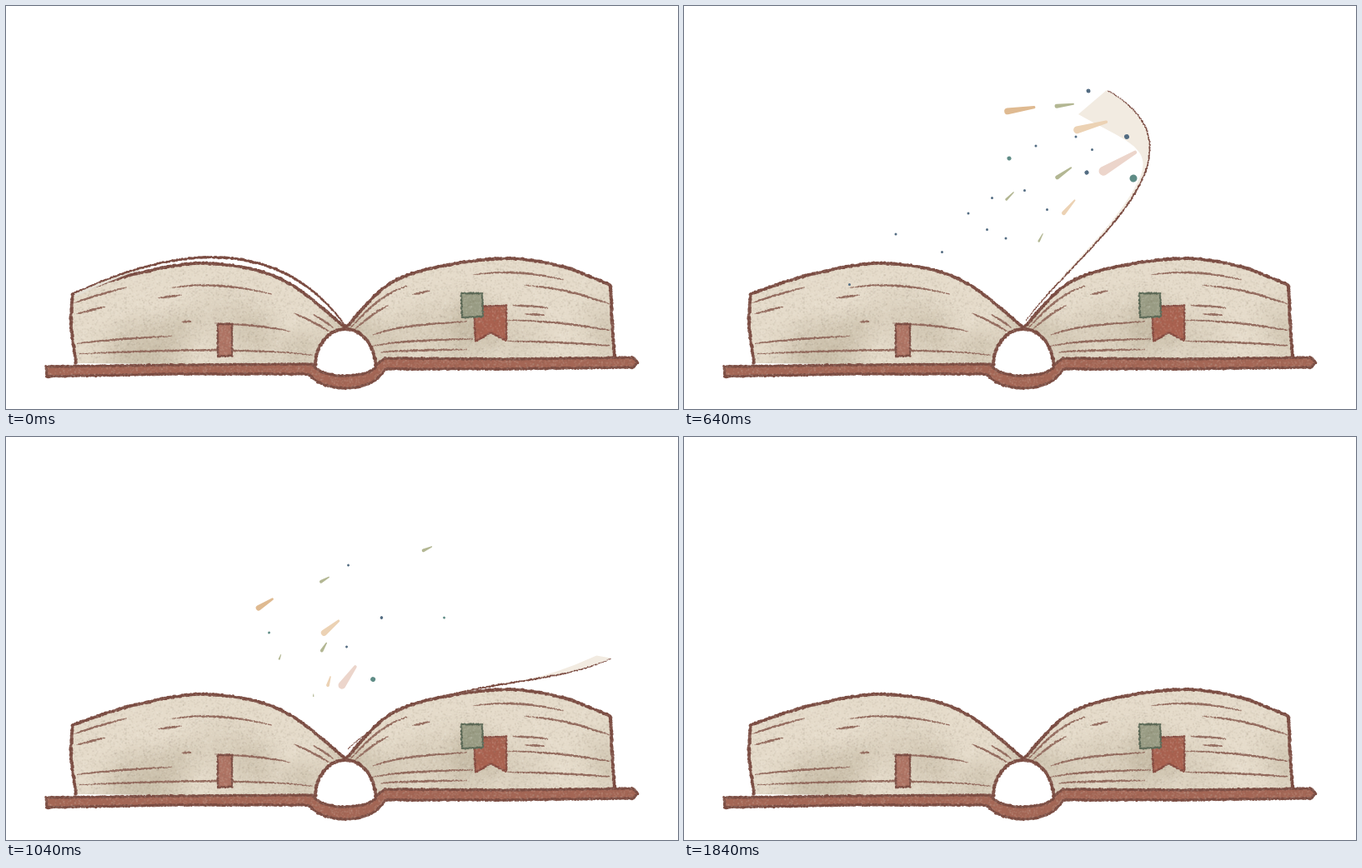
Animation of 806x484 px, one loop 1.92 s. Source, as an HTML page with a canvas:

```html
<!DOCTYPE html>
<html lang="en">
<head>
<meta charset="utf-8">
<title>Book turning a page</title>
<style>
html, body { margin: 0; width: 100%; height: 100%; overflow: hidden; background: #fff; }
canvas { display: block; }
</style>
</head>
<body>
<canvas id="stage" width="806" height="484"></canvas>
<script>
const W = 806, H = 484, LOOP = 1920, STEP = 80;
const stage = document.getElementById('stage').getContext('2d');

const DARK = '#7b4c42', CREASE = '#936a5d', COVER = '#a46655', PAPER = '#e5dbca';
const BLUE = '#536c82', TEAL = '#5f8c86', OLIVE = '#b3b793';
const OCHRE = '#dfba91', SAND = '#ecd2b4', ROSE = '#ecd5cb';

const mix = (a, b, u) => a + (b - a) * u;
const clamp = u => Math.min(1, Math.max(0, u));
const smooth = u => clamp(u) ** 2 * (3 - 2 * clamp(u));

function random(seed) {
  let s = seed * 7919 + 13;
  return () => (s = (s * 16807) % 2147483647) / 2147483647;
}

const spline = (a, b, c, d, u) => 0.5 * (2 * b + (c - a) * u +
  (2 * a - 5 * b + 4 * c - d) * u * u + (3 * b - a - 3 * c + d) * u ** 3);

// Catmull-Rom samples through points
function curve(pts, n = 16) {
  const out = [];
  for (let i = 0; i < pts.length - 1; i++) {
    const b = pts[i], c = pts[i + 1], a = pts[i - 1] || b, d = pts[i + 2] || c;
    for (let k = 0; k < n; k++) out.push([0, 1].map(j => spline(a[j], b[j], c[j], d[j], k / n)));
  }
  out.push(pts[pts.length - 1]);
  return out;
}

function arc(cx, cy, rx, ry, from, to, n = 40) {
  return Array.from({ length: n + 1 }, (_, i) => {
    const a = mix(from, to, i / n) * Math.PI;
    return [cx + rx * Math.cos(a), cy + ry * Math.sin(a)];
  });
}

function fill(g, pts, color) {
  g.beginPath();
  pts.forEach(p => g.lineTo(p[0], p[1]));
  g.closePath();
  g.fillStyle = color;
  g.fill();
}

// Dry-brush line: overlapping blots of uneven size
function brush(g, pts, color, width, seed, taper = 0) {
  const rnd = random(seed), last = pts.length - 1;
  g.fillStyle = color;
  g.beginPath();
  for (let i = 0; i < last; i++) {
    const [x, y] = pts[i], [x2, y2] = pts[i + 1];
    const n = Math.max(1, Math.ceil(Math.hypot(x2 - x, y2 - y) / 1.2));
    for (let k = 0; k < n; k++) {
      const u = k / n, s = 2 * (i + u) / last - 1;
      const r = width / 2 * (0.7 + 0.5 * rnd()) * (1 - taper * s * s);
      const px = mix(x, x2, u) + rnd() - 0.5, py = mix(y, y2, u) + rnd() - 0.5;
      g.moveTo(px + r, py);
      g.arc(px, py, r, 0, 7);
    }
  }
  g.fill();
}

function tag(g, pts, color, edge) {
  fill(g, pts, color);
  brush(g, [...pts, pts[0]], edge, 2.4, 5);
}

// Half of the pages; each crease is [x from, x to, depth below the top edge]
const left = {
  top: curve([[80, 346], [150, 323], [240, 309], [330, 328], [407, 386]]),
  bottom: 429,
  creases: [[82, 148, .13], [83, 122, .3], [180, 215, .31], [198, 320, .22], [345, 390, .35],
    [365, 396, .22], [208, 224, .58], [250, 345, .6], [84, 205, .72], [88, 369, .87]]
};
const right = {
  top: curve([[409, 385], [470, 328], [580, 304], [660, 311], [725, 335]]),
  bottom: 423,
  creases: [[558, 672, .14], [620, 726, .26], [604, 655, .47], [622, 650, .55], [488, 516, .25],
    [413, 482, .13], [417, 460, .28], [438, 560, .62], [600, 726, .62], [440, 562, .8],
    [600, 728, .83], [446, 556, .91]]
};

function depthLine({ top, bottom }, from, to, v) {
  return top.filter(p => p[0] >= from && p[0] <= to).map(([x, y]) => [x, mix(y, bottom, v)]);
}

function makeBook() {
  const canvas = document.createElement('canvas');
  canvas.width = W;
  canvas.height = H;
  const g = canvas.getContext('2d');
  const rnd = random(24);

  const leftSide = curve([[80, 346], [78, 382], [84, 429]]);
  const rightSide = curve([[725, 335], [727, 380], [730, 423]]);
  const archLeft = arc(407, 432, 36, 44, 1.5, 1), archRight = arc(407, 432, 36, 44, 1.5, 2);
  fill(g, [...left.top, ...archLeft, ...leftSide.slice().reverse()], PAPER);
  fill(g, [...right.top, ...rightSide, ...archRight.slice().reverse()], PAPER);

  // Watercolour blotches
  g.globalCompositeOperation = 'source-atop';
  for (let i = 0; i < 24; i++) {
    const x = 80 + 650 * rnd(), y = 370 + 60 * rnd(), r = 25 + 40 * rnd();
    const wash = g.createRadialGradient(x, y, 0, x, y, r);
    wash.addColorStop(0, 'rgba(165,152,125,.2)');
    wash.addColorStop(1, 'rgba(165,152,125,0)');
    g.fillStyle = wash;
    g.fillRect(x - r, y - r, 2 * r, 2 * r);
  }
  g.globalCompositeOperation = 'source-over';

  for (const block of [left, right]) {
    block.creases.forEach((c, i) => brush(g, depthLine(block, ...c), CREASE, 2.6, i + 3, 0.5));
  }

  const cover = [
    [48, 433], [200, 431], [364, 430], ...arc(407, 431, 37, 13, 1, 0), [454, 423], [600, 424],
    [752, 422], [758, 428], [752, 434], [600, 436], [456, 436],
    ...arc(407, 435, 45, 24, 0.1, 0.87), [362, 442], [200, 442], [49, 445]
  ];
  fill(g, cover, COVER);
  brush(g, [...cover, cover[0]], DARK, 3.2, 41);
  [archLeft, archRight, left.top, right.top, leftSide, rightSide]
    .forEach((line, i) => brush(g, line, DARK, 3.8, 50 + i));

  tag(g, [[254, 382], [271, 382], [271, 420], [254, 421]], '#ae7363', DARK);
  tag(g, [[561, 361], [600, 360], [600, 402], [582, 392], [563, 403]], '#a9614f', '#874b40');
  tag(g, [[546, 345], [571, 345], [572, 373], [547, 374]], '#999c84', '#5a6855');

  // Paper grain
  g.globalCompositeOperation = 'source-atop';
  for (let i = 0; i < 30000; i++) {
    g.fillStyle = rnd() < 0.5 ? 'rgba(80,55,40,.05)' : 'rgba(255,250,240,.08)';
    g.fillRect(rnd() * W, 295 + rnd() * 170, 1.8, 1.8);
  }
  return canvas;
}

// Poses of the turning page: Bezier from spine to tip, then the free corner
const poses = [
  { t: 0, at: [407, 384, 350, 305, 250, 266, 82, 345, 84, 349] },
  { t: 320, at: [406, 378, 440, 210, 375, 231, 231, 287, 237, 307] },
  { t: 480, at: [412, 370, 510, 270, 472, 82, 301, 239, 292, 280] },
  { t: 640, at: [410, 378, 470, 295, 645, 178, 507, 101, 473, 130] },
  { t: 880, at: [410, 375, 500, 280, 634, 298, 709, 200, 673, 208] },
  { t: 1200, at: [410, 375, 520, 285, 640, 302, 719, 321, 719, 310] },
  { t: 1360, at: [410, 378, 520, 285, 640, 302, 722, 337, 722, 333] }
];

function drawPage(t) {
  const i = poses.findIndex(p => p.t > t);
  if (i < 1) return;
  const b = poses[i - 1], c = poses[i], a = poses[i - 2] || b, d = poses[i + 1] || c;
  const u = (t - b.t) / (c.t - b.t);
  const v = b.at.map((_, j) => spline(a.at[j], b.at[j], c.at[j], d.at[j], u));
  const outer = [], inner = [], n = 60;
  for (let k = 0; k <= n; k++) {
    const s = k / n, q = 1 - s, w = smooth((s - 0.6) / 0.4);
    const [x, y] = [0, 1].map(j =>
      q ** 3 * v[j] + 3 * q * q * s * v[2 + j] + 3 * q * s * s * v[4 + j] + s ** 3 * v[6 + j]);
    outer.push([x, y]);
    inner.unshift([x + (v[8] - v[6]) * w - 4 * Math.sin(Math.PI * s), y + (v[9] - v[7]) * w]);
  }
  const light = clamp((t - 480) / 160);
  fill(stage, [...outer, ...inner], `rgb(${mix(228, 242, light)},${mix(223, 235, light)},${mix(212, 225, light)})`);
  brush(stage, outer, DARK, mix(3.2, 2.2, light), 60 + t / STEP, 0.45);
}

// Ink dots that swirl off the page while it lifts: [x, y] at 480 ms
const ink = [[349, 251], [291, 247], [368, 242], [254, 289], [328, 287], [403, 197], [394, 246],
  [412, 278], [364, 278], [379, 296], [435, 202], [448, 224]];

// Larger flecks let go at the top of the turn: [color, x, y, width] at 640 ms
const dots = [[TEAL, 390, 183, 5], [TEAL, 539, 207, 9], [TEAL, 600, 165, 5],
  [BLUE, 531, 157, 6], [BLUE, 483, 200, 5], [BLUE, 485, 102, 5]];
const streaks = [[OCHRE, 404, 124, 8], [SAND, 489, 144, 9], [ROSE, 522, 187, 11], [SAND, 462, 241, 5],
  [OLIVE, 457, 119, 5], [OLIVE, 456, 200, 5], [OLIVE, 391, 228, 3], [OLIVE, 428, 278, 2.5], [OLIVE, 580, 82, 5]];

// Blunt, tapering blot; a zero length gives a dot
function blot(color, x, y, width, length, angle) {
  const r = width / 2, half = Math.max(0, length - width) / 2, thin = half ? r * 0.4 : r;
  stage.save();
  stage.translate(x, y);
  stage.rotate(angle);
  stage.fillStyle = color;
  stage.beginPath();
  stage.arc(-half, 0, r, Math.PI / 2, Math.PI * 1.5);
  stage.arc(half, 0, thin, -Math.PI / 2, Math.PI / 2);
  stage.fill();
  stage.restore();
}

function drawInk([x, y], i, t) {
  const dt = t - 480, born = 200 + 24 * i;
  const size = clamp((t - born) / 100) * clamp((820 - t) / 300);
  const turn = dt / 320;
  if (size) blot(BLUE, x + (x - 365) * turn, y + (345 - x) * turn, 5 * size, 0, 0);
}

// Wide flecks drift and fall faster, shrink with age and vanish near the book
function drawFleck([color, x, y, w], t, long) {
  const dt = t - 640, born = 560 + Math.max(0, x - 545) * 4;
  const px = x - (0.13 + 0.018 * w) * dt * (1 - dt / 2600);
  const py = y + (0.03 + 0.02 * w) * dt;
  const age = dt / Math.min(1180, 600 + 70 * w);
  const grow = clamp((t - born) / 80) * clamp((345 - py) / 50);
  const size = grow * clamp(1 - age);
  if (!size) return;
  const angle = -Math.max(0, y - 100) * 0.35 - Math.max(0, dt) * 0.06;
  const width = w * (long ? Math.sqrt(size) : size);
  blot(color, px, py, width, long ? 5 * w * size : 0, angle * Math.PI / 180);
}

const book = makeBook();
const start = performance.now();

function draw() {
  const now = Math.max(0, performance.now() - start) % LOOP;
  const t = Math.floor(now / STEP) * STEP;
  stage.fillStyle = '#fff';
  stage.fillRect(0, 0, W, H);
  if (t >= 640) drawPage(t);
  stage.drawImage(book, 0, 0);
  if (t < 640) drawPage(t);
  streaks.forEach(f => drawFleck(f, t, true));
  dots.forEach(f => drawFleck(f, t, false));
  ink.forEach((p, i) => drawInk(p, i, t));
  requestAnimationFrame(draw);
}
draw();
</script>
</body>
</html>
```
